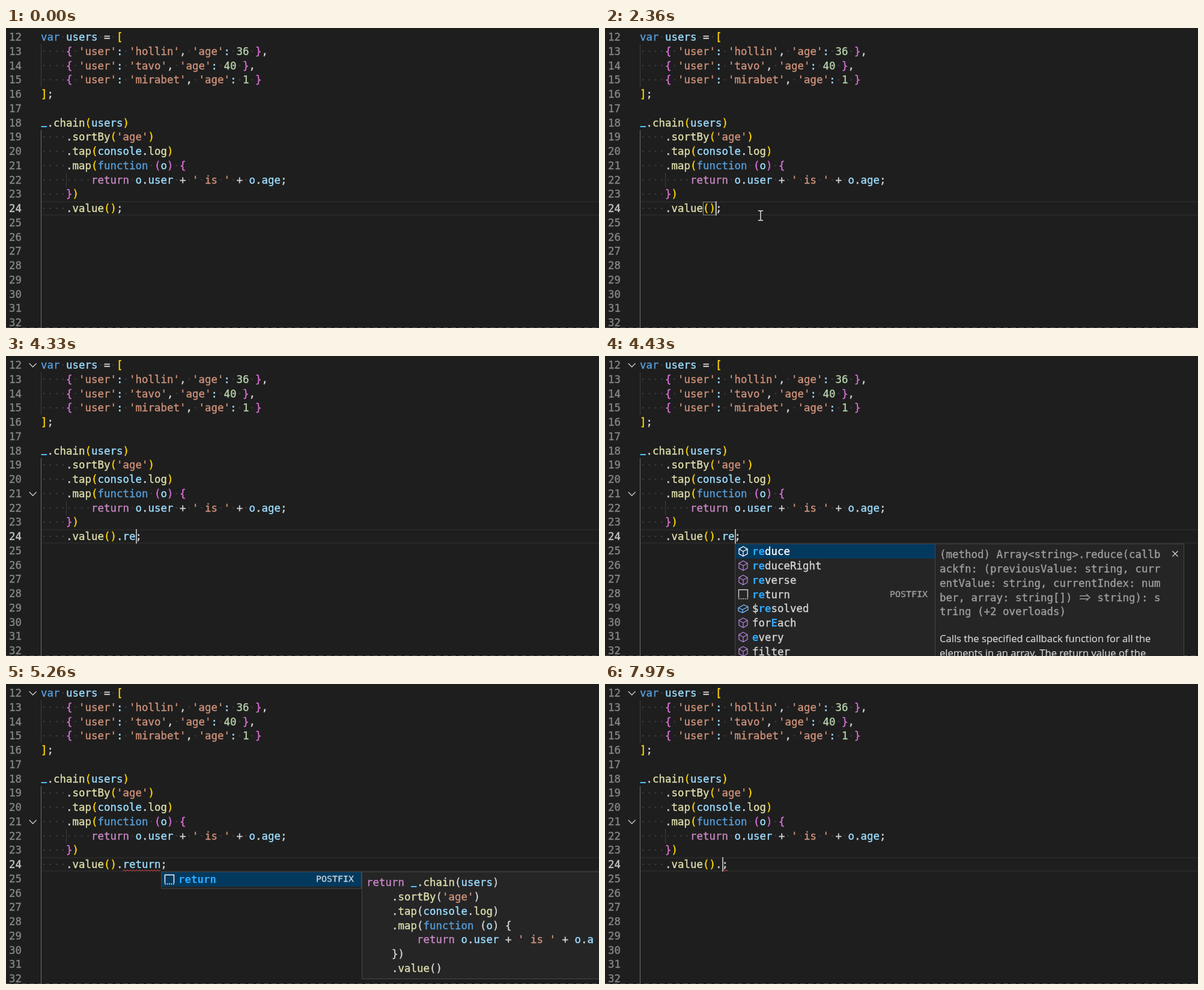
An HTML page for the animation above (8000 ms loop, 987 px wide and 499 px high).

```html
<!DOCTYPE html>
<html lang="en">
<head>
<meta charset="utf-8">
<title>Postfix completion</title>
<style>
  html, body { margin: 0; width: 100%; height: 100%; overflow: hidden; background: #1e1e1e; }
  svg { display: block; width: 987px; height: 499px; }
  text { font: 17.44px "DejaVu Sans Mono", "Noto Sans Mono", monospace; white-space: pre; stroke-width: .4px; }
  text.small { font-size: 14.95px; }
  text.prose { font: 16.6px "Open Sans", "Noto Sans", sans-serif; stroke-width: .2px; }
  text.bold { font-weight: 700; stroke-width: 0; }
</style>
</head>
<body>
<svg id="stage" viewBox="0 0 987 499">
  <g id="base"></g>
  <g id="head"></g>
  <g id="tail"></g>
  <path id="foldA" d="M38.7 12.2l6 6l6 -6" fill="none" stroke="#c5c5c5" stroke-width="1.4"/>
  <path id="foldB" d="M38.7 226.2l6 6l6 -6" fill="none" stroke="#c5c5c5" stroke-width="1.4"/>
  <rect id="match" x="163.5" y="289.5" width="20.5" height="21.5" fill="none" stroke="#888"/>
  <path id="squiggle" fill="none" stroke="#f14c4c"/>
  <rect id="caret" y="288" width="2" height="24" fill="#aeafad"/>
  <g id="popup"></g>
  <path id="mouse" d="M-4 -8h3l1 1l1 -1h3M0 -7V7M-4 8h3l1 -1l1 1h3" fill="none" stroke="#e8e8e8" stroke-width="1.4"/>
</svg>
<script>
const LOOP = 8000, CELL = 10.5, ROW = 23.75, LEFT = 58, TOP = 3;
const $ = id => document.getElementById(id);
const esc = s => s.replace(/&/g, '&amp;').replace(/</g, '&lt;');
const colX = col => LEFT + col * CELL;
const rowY = line => TOP + (line - 12) * ROW;

const label = (x, mid, s, fill, cls = '') =>
  `<text x="${x}" y="${Math.round(mid + 6.3)}" fill="${fill}" stroke="${fill}" class="${cls}">${esc(s)}</text>`;
const stroke = (d, color, width = 1, extra = '') =>
  `<path d="${d}" fill="none" stroke="${color}" stroke-width="${width}" ${extra}/>`;
const panel = (x, y, w, h) =>
  `<rect x="${x + .5}" y="${y + .5}" width="${w}" height="${h}" fill="#252526" stroke="#454545"/>`;

// Syntax colouring; bracket depth carries over from line to line.
let depth = 0;
function color(tok, before, after, pairs) {
  if (/^'/.test(tok)) return '#ce9178';
  if (/^\d/.test(tok)) return '#b5cea8';
  if (pairs && /[[({]/.test(tok)) return depth++ ? '#da70d6' : '#ffd700';
  if (pairs && /[\])}]/.test(tok)) return --depth ? '#da70d6' : '#ffd700';
  if (tok === ':') return '#9cdcfe';
  if (!/^\w/.test(tok)) return '#d4d4d4';
  if (!before.endsWith('.')) {
    if (tok === 'return') return '#c586c0';
    if (tok === 'var' || tok === 'function') return '#569cd6';
    if (tok === '_') return '#4fc1ff';
  }
  return after[0] === '(' || tok === 'log' ? '#dcdcaa' : '#9cdcfe';
}

function code(x, mid, src, pairs = true) {
  let out = '';
  for (const m of src.matchAll(/'[^']*'|\w+|[^\s\w]/g)) {
    const end = m.index + m[0].length, left = x + m.index * CELL;
    const fill = color(m[0], src.slice(0, m.index), src.slice(end), pairs);
    out += m[0] === '_'
      ? `<rect x="${left + .5}" y="${Math.round(mid + 6)}" width="9.5" height="2" fill="${fill}"/>`
      : label(left, mid, m[0], fill);
  }
  if (pairs) [...src].forEach((c, i) => {
    if (c === ' ') out += `<circle cx="${x + (i + .5) * CELL}" cy="${mid}" r="1.2" fill="#404040"/>`;
  });
  return out;
}
const codeLine = (line, src) => code(LEFT, rowY(line) + ROW / 2, src);

const chain = [
  '_.chain(users)',
  "    .sortBy('age')",
  '    .tap(console.log)',
  '    .map(function (o) {',
  "        return o.user + ' is ' + o.age;",
  '    })',
  '    .value()'
];
const source = [
  'var users = [',
  "    { 'user': 'hollin', 'age': 36 },",
  "    { 'user': 'tavo', 'age': 40 },",
  "    { 'user': 'mirabet', 'age': 1 }",
  '];', '', '', ...chain.slice(1, 6)
];

function drawBase() {
  let out = stroke('M58 289H987M58 311H987', '#282828', 2);
  out += stroke('M58.5 27V98M100.5 241V265', '#404040');
  out += stroke('M58.5 170V499', '#707070');
  out += stroke('M0 498.5H987', '#555', 1, 'stroke-dasharray="8 5"');
  for (let n = 12; n <= 32; n++)
    out += label(5, rowY(n) + ROW / 2, String(n), n === 24 ? '#c6c6c6' : '#858585');
  source.forEach((s, i) => out += codeLine(12 + i, s));
  $('base').innerHTML = out;
}

const icons = {
  cube: c => stroke('M0 -8L7 -4V4L0 8L-7 4V-4ZM-7 -4L0 0L7 -4M0 0V8', c, 1.3),
  field: c => stroke('M-8 -1L1 -6L8 -3V2L-1 7L-8 4ZM-8 -1L-1 2L8 -3M-1 2V7', c, 1.3),
  snippet: c => stroke('M-7.5 6V-7.5H7.5V6', c, 1.4) + stroke('M-8 7.5H8', c, 1.6, 'stroke-dasharray="2 1.5"')
};
const PURPLE = '#b180d7';
// Icon, icon colour, text, start and length of the matched part
const methods = [
  ['cube', '#fff', 'reduce', 0, 2], ['cube', PURPLE, 'reduceRight', 0, 2],
  ['cube', PURPLE, 'reverse', 0, 2], ['snippet', '#ccc', 'return', 0, 2],
  ['field', '#75beff', '$resolved', 1, 2], ['cube', PURPLE, 'forEach', 3, 1],
  ['cube', PURPLE, 'every', 0, 1], ['cube', PURPLE, 'filter', 0, 0]
];

function menu(x, items) {
  let out = panel(x, 312, 333, items.length * ROW + 4);
  out += `<rect x="${x + 1}" y="313" width="332" height="24" fill="#04395e"/>`;
  items.forEach(([icon, tint, name, start, len], i) => {
    const mid = 325 + i * ROW, plain = i ? '#d4d4d4' : '#fff';
    out += `<g transform="translate(${x + 14} ${mid})">${icons[icon](tint)}</g>`;
    [[0, start, plain], [start, start + len, '#2aaaff', 'bold'], [start + len, 99, plain]]
      .forEach(([a, b, fill, cls]) => {
        if (name.slice(a, b)) out += label(x + 29 + a * CELL, mid, name.slice(a, b), fill, cls);
      });
    if (icon === 'snippet') out += label(x + 258, mid - 2, 'POSTFIX', i ? '#9b9b9b' : '#bccbd6', 'small');
  });
  return out;
}

function methodDocs() {
  const rows = [
    '(method) Array<string>.reduce(callb', 'ackfn: (previousValue: string, curr',
    'entValue: string, currentIndex: num', 'ber, array: string[])    string): s',
    'tring (+2 overloads)'
  ];
  let out = panel(549, 312, 414, 200);
  rows.forEach((s, i) => out += label(557, 330 + i * ROW, s, '#9d9d9d'));
  out += stroke('M790 399H804M790 404H804M801 396L807 401.5L801 407', '#9d9d9d', 1.4);
  out += stroke('M944.5 324.5l9 9m0 -9l-9 9', '#d0d0d0', 1.4);
  out += label(557, 470, 'Calls the specified callback function for all the', '#d4d4d4', 'prose');
  return out + label(557, 494, 'elements in an array. The return value of the', '#d4d4d4', 'prose');
}

function returnDocs(x) {
  let out = panel(x, 312, 420, 178);
  chain.forEach((s, i) => {
    const row = i === 4 ? s.slice(0, 36) : s;
    out += code(x + 8, 330 + i * ROW, i ? row : 'return ' + row, false);
  });
  return out;
}

// Edits of the last line: time, text after ".value()", caret column
const edits = [
  [0, '', 12], [30, '', 12], [2060, '', 12], [4010, '.', 13], [4150, '.r', 14], [4290, '.re', 15],
  [4530, '.ret', 16], [4590, '.retu', 17], [4640, '.retur', 18], [4690, '.return', 19],
  [5360, '', 12], [6940, '.return', 19], [7570, '.', 13]
];

const path = [
  [870, 507, 495], [1150, 420, 400], [1400, 300, 330], [1660, 217, 316], [1690, 220, 318],
  [2060, 259, 312], [2390, 259, 312], [2490, 405, 358], [2560, 494, 410], [2680, 330, 450], [2800, 97, 497]
];
function pointer(t) {
  const i = path.findIndex(p => p[0] > t);
  if (i < 1) return null;
  const [a, b] = [path[i - 1], path[i]], k = (t - a[0]) / (b[0] - a[0]);
  return [1, 2].map(j => Math.round(a[j] + (b[j] - a[j]) * k));
}

const during = (t, a, b) => t >= a && t < b;
const show = (id, on) => $(id).setAttribute('visibility', on ? 'visible' : 'hidden');
const drawn = {};
function fill(id, key, make) {
  if (drawn[id] === key) return;
  drawn[id] = key;
  $(id).innerHTML = make();
}

function wave(from, to) {
  let d = `M${from} 311.5`;
  for (let x = from, up = true; x + 2.5 <= to; x += 2.5, up = !up) d += `l2.5 ${up ? -2.5 : 2.5}`;
  return d;
}

function popup(t, text, x) {
  if (during(t, 4360, 4530)) {
    const docs = t >= 4430;
    return fill('popup', 'list' + docs, () => menu(216, methods) + (docs ? methodDocs() : ''));
  }
  if (during(t, 4530, 5360)) {
    const left = Math.round(x), len = text.length - 1;
    return fill('popup', text, () =>
      menu(left, [['snippet', '#fff', 'return', 0, len]]) + returnDocs(left + 334));
  }
  fill('popup', '', () => '');
}

function render(t) {
  const [start, text, col] = edits.filter(e => e[0] <= t).pop();
  const focused = during(t, 30, 260) || t >= 2060;
  const expanded = during(t, 5360, 6940);

  fill('head', String(expanded), () => codeLine(18, (expanded ? 'return ' : '') + chain[0]));
  fill('tail', text, () => codeLine(24, chain[6] + text + ';'));

  $('caret').setAttribute('x', Math.round(colX(col)));
  show('caret', focused && Math.floor((t - start) / 500) % 2 === 0);
  show('match', focused && !text);

  const fade = Math.min(1, Math.max(0, (t - 3060) / 500));
  const opacity = 1 - (1 - fade) ** 2.3;
  $('foldA').setAttribute('opacity', opacity);
  $('foldB').setAttribute('opacity', during(t, 5360, 5460) || during(t, 6970, 7130) ? 0 : opacity);

  const short = t >= 7970;
  show('squiggle', during(t, 5260, 5360) || during(t, 7330, 7570) || short);
  $('squiggle').setAttribute('d', wave(194.5, short ? 206 : 258));

  popup(t, text, colX(col));

  const at = pointer(t);
  show('mouse', at);
  if (at) $('mouse').setAttribute('transform', `translate(${at})`);
}

drawBase();
const began = performance.now();
function tick() {
  render((performance.now() - began) % LOOP);
  requestAnimationFrame(tick);
}
tick();
</script>
</body>
</html>
```
